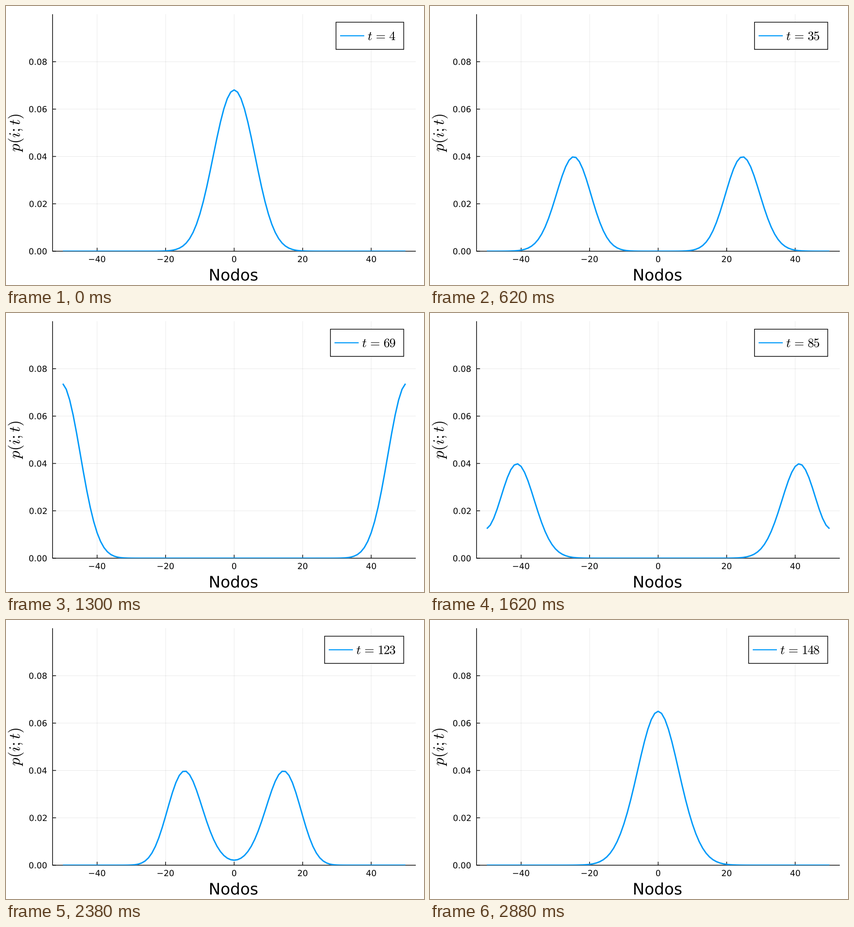
A matplotlib script for the animation above (2.9 s loop, 917x611 px).

```python
import numpy as np
import matplotlib.pyplot as plt
from matplotlib.animation import FuncAnimation
from matplotlib.patches import PathPatch, Rectangle
from matplotlib.path import Path
from matplotlib.textpath import TextPath
from matplotlib.transforms import Affine2D

plt.rcParams["font.family"] = "DejaVu Sans"
plt.rcParams["mathtext.fontset"] = "cm"

W, H, DPI = 917, 611, 100
LEFT, RIGHT, TOP, BASE = 102.2, 899, 18, 537
BLUE = "#009afa"
FRAMES, T0 = 145, 4

fig = plt.figure(figsize=(W / DPI, H / DPI), dpi=DPI, facecolor="white")
ax = fig.add_axes([0, 0, 1, 1])
ax.set_xlim(0, W)
ax.set_ylim(H, 0)
ax.axis("off")


def px(x):
    return 500.5 + 7.516 * x


def py(p):
    return BASE - 5187.5 * p


def stroke(xs, ys, width=1.5, color="black", **kw):
    return ax.plot(xs, ys, color=color, lw=width * 72 / DPI, snap=False,
                   solid_capstyle="butt", **kw)[0]


def outline(s, size, angle=0):
    p = TextPath((0, 0), s, size=size)
    flipped = Path(p.vertices * [1, -1], p.codes)
    return flipped.transformed(Affine2D().rotate_deg(-angle))


def shift(path, dx, dy):
    return path.transformed(Affine2D().translate(dx, dy))


def label(s, size, x, y, ha="center", angle=0):
    """Place text by its ink box, centred vertically on y."""
    path = outline(s, size, angle)
    box = path.get_extents()
    edge = box.x1 if ha == "right" else (box.x0 + box.x1) / 2
    path = shift(path, x - edge, y - (box.y0 + box.y1) / 2)
    ax.add_patch(PathPatch(path, fc="black", lw=0))


# Grid, axes and ticks
for x in (-40, -20, 0, 20, 40):
    stroke([px(x)] * 2, [TOP, BASE], 0.9, alpha=0.1, zorder=1)
    stroke([px(x)] * 2, [BASE, BASE - 7.5], zorder=2)
    label(str(x).replace("-", "\u2212"), 18.3, px(x), 554.2)
for p in (0, 0.02, 0.04, 0.06, 0.08):
    if p:
        stroke([LEFT, RIGHT], [py(p)] * 2, 0.9, alpha=0.1, zorder=1)
    stroke([LEFT, LEFT + 7.5], [py(p)] * 2, zorder=2)
    label(f"{p:.2f}", 18.3, 89.2, py(p) + 0.2, ha="right")
stroke([LEFT, LEFT], [TOP, BASE + 0.75], zorder=2)
stroke([LEFT, RIGHT], [BASE, BASE], zorder=2)
label("Nodos", 34.8, 499.8, 588.2)
label("$p(i;t)$", 34.6, 21.5, 279.2, angle=90)

# Lattice wave equation with c^2 = 1/2 and reflecting ends, solved in cosine modes
N = 101
site = np.arange(N)
nodes = site - N // 2
modes = np.cos(np.pi * np.outer(site + 0.5, site) / N)
start = np.exp(-nodes ** 2 / 50)
start /= start.sum()
coef = modes.T @ start * 2 / N
coef[0] /= 2
omega = np.sqrt(2) * np.sin(np.pi * site / (2 * N))


def wave(t):
    return modes @ (coef * np.cos(omega * t))


curve = stroke(px(nodes), py(start), 3.05, BLUE, zorder=3)
curve.set_clip_path(Rectangle((LEFT, TOP), RIGHT - LEFT, BASE - TOP,
                              transform=ax.transData))

# Legend
frame = Rectangle((724, 35.5), 148.5, 59.5, fc="white", ec="black",
                  lw=1.5 * 72 / DPI, snap=False, zorder=4)
ax.add_patch(frame)
sample = stroke([733, 786], [65.2, 65.2], 2.3, BLUE, zorder=5)
caption = PathPatch(outline("$t$", 27.8), fc="black", lw=0, zorder=5)
ax.add_patch(caption)


def draw(n):
    t = T0 + n
    curve.set_ydata(py(wave(t)))
    digits = r"\hspace{-0.05}".join(str(t))
    text = outline(rf"$t\hspace{{0.116}}=\hspace{{0.116}}{digits}$", 27.8)
    box = text.get_extents()
    caption.set_path(shift(text, 853.7 - box.x1, 74.6))
    x = 853.7 - box.width - 70.2
    frame.set_x(x)
    frame.set_width(872.5 - x)
    sample.set_xdata([x + 9, x + 62])
    return curve, frame, sample, caption


anim = FuncAnimation(fig, draw, frames=FRAMES, interval=20, repeat=True, blit=False)
plt.show()
```
